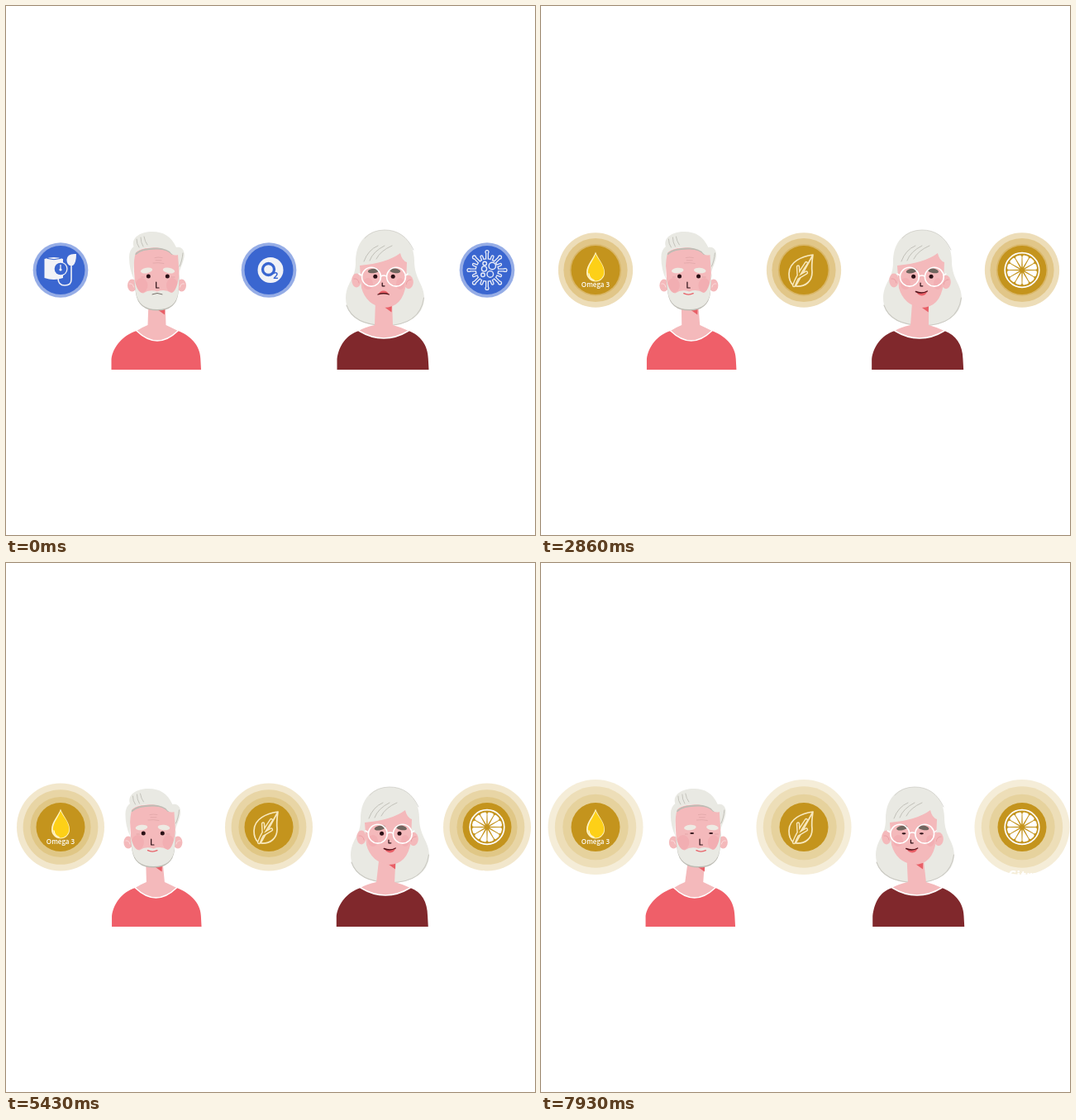
Recreate the animation shown at these times as an HTML page with a canvas. Size 640 by 640 pixels, loop 8000 ms.

```html
<!DOCTYPE html>
<html lang="en">
<head>
<meta charset="utf-8">
<title>Wellness</title>
<style>
html, body { margin: 0; width: 100%; height: 100%; overflow: hidden; background: #fff; }
canvas { display: block; width: 100vmin; height: 100vmin; }
</style>
</head>
<body>
<canvas id="stage" width="640" height="640"></canvas>
<script>
const ctx = document.getElementById('stage').getContext('2d');
const LOOP = 8000, CY = 319.5, TAU = Math.PI * 2;
const DISCS = [66, 318, 582];
const BLUE = [58, 102, 208], GOLD = [196, 148, 29];
const SKIN = '#f4b9bb', HAIR = '#e9e9e3', SHADE = '#bdbcb4', RED = '#e85f67', DARK = '#2b1016';
const SWAP = 2420;
const PULSES = [-30, 2370, 4750, 7130], PULSE_MS = 1150;
const MAN_SWAY = [[2430, 0], [3350, -8], [4400, 8], [5700, -6], [7200, 0], [8000, 8]];
const WOMAN_SWAY = [[2430, 0], [3300, 6], [4350, -6], [5400, 6], [7210, -1], [7950, -6]];

const clamp = x => Math.min(1, Math.max(0, x));
const mix = (a, b, k) => a + (b - a) * k;
const ease = x => (1 - Math.cos(Math.PI * clamp(x))) / 2;
const span = (t, a, b) => clamp((t - a) / (b - a));
const rgb = (c, a = 1) => `rgba(${c.map(Math.round).join(',')},${a})`;

function track(keys, t) {
  if (t <= keys[0][0]) return keys[0][1];
  for (let i = 1; i < keys.length; i++) {
    const [a, va] = keys[i - 1], [b, vb] = keys[i];
    if (t < b) return mix(va, vb, ease((t - a) / (b - a)));
  }
  return keys[keys.length - 1][1];
}

function fill(d, color) {
  ctx.fillStyle = color;
  ctx.fill(new Path2D(d));
}
function line(d, color, width = 1) {
  ctx.strokeStyle = color;
  ctx.lineWidth = width;
  ctx.stroke(new Path2D(d));
}
function oval(x, y, rx, ry, color, turn = 0) {
  ctx.beginPath();
  ctx.ellipse(x, y, rx, ry, turn, 0, TAU);
  ctx.fillStyle = color;
  ctx.fill();
}
const dot = (x, y, r, color) => oval(x, y, r, r, color);
function ring(x, y, r, color, width) {
  ctx.beginPath();
  ctx.arc(x, y, r, 0, TAU);
  ctx.strokeStyle = color;
  ctx.lineWidth = width;
  ctx.stroke();
}
function label(s, x, y, font, color) {
  ctx.font = font;
  ctx.textAlign = 'center';
  ctx.fillStyle = color;
  ctx.fillText(s, x, y);
}
function shifted(dx, draw) {
  ctx.save();
  ctx.translate(dx, 0);
  draw();
  ctx.restore();
}

// Icons are drawn in stage coordinates; bg is the disc colour behind them.
function pressureIcon(bg) {
  const w = '#f1f2f7';
  fill('M46.5 306 Q58 302 69 306 V329 Q58 333 46.5 329Z', w);
  line('M50 305.5 Q58 308 66 305.5', bg, 1);
  dot(66, 318, 8.6, w);
  dot(66, 318, 7.3, bg);
  line('M66 313.5 V319', w, 1.3);
  dot(66, 319, 1.6, w);
  line('M63 329 Q63 338 71 338 Q79 338 79 331 V312', w, 1.6);
  fill('M85 300 Q74 299 73.5 307 Q73.5 312 77 314 H81 Q85 311 85 300Z', w);
}

function oxygenIcon(bg) {
  dot(320, 319.5, 15.5, '#f1f2f7');
  ring(317.5, 318.5, 7, bg, 3.3);
  label('2', 326.2, 330, 'bold 10.5px "Open Sans", sans-serif', bg);
}

function virusIcon(bg) {
  const layer = (color, grow) => {
    for (let i = 0; i < 16; i++) {
      const a = i * TAU / 16, long = i % 2 === 0;
      const x = Math.cos(a), y = Math.sin(a), r = long ? 22 : 17.5;
      line(`M${582 + x * 12} ${CY + y * 12} L${582 + x * r} ${CY + y * r}`, color, 1.4 + grow * 2);
      if (long) dot(582 + x * r, CY + y * r, 1.3 + grow, color);
    }
    dot(582, CY, 13 + grow, color);
  };
  layer('#e9edf8', 1.3);
  layer(bg, 0);
  [[588.3, 314.5, 4.2], [578.5, 318, 3.1], [585.8, 324.4, 3.8], [577, 325.3, 2.3], [579.2, 311.5, 2.3]]
    .forEach(([x, y, r]) => ring(x, y, r, '#e9edf8', 1.4));
}

function omegaIcon() {
  fill('M66 297.5 C63 306 55 313 55 322.5 A11 11 0 0 0 77 322.5 C77 313 69 306 66 297.5Z', '#fff3c4');
  fill('M66 300 C64 307 57 314 56.8 322 A9.6 10 0 0 0 76.3 322.5 C76.3 313 69 307 66 300Z', '#fdd017');
  line('M58 324 Q59 330 64 331.5', '#fff7da', 1.3);
  label('Omega 3', 66, 340, '600 8px "Open Sans", sans-serif', '#fff');
}

function leafIcon(bg) {
  const c = '#f8e8bd';
  line('M329 301 C316 303 300 309 300 324 C300 331 302 335 305 337.5 M308 339 C320 340 328 333 328 322 C327 314 328 308 329 301Z', c, 1.7);
  const veins = 'M306 338 Q310 327 321 311 M311.5 325 L311 315.5 M310 329 L321 322.5';
  line(veins, c, 4.4);
  line(veins, bg, 1.5);
}

function citrusIcon() {
  ring(582, CY, 20.8, '#fff', 1.7);
  ctx.fillStyle = '#fff';
  for (let i = 0; i < 12; i++) {
    ctx.save();
    ctx.translate(582, CY);
    ctx.rotate((i + 0.5) * TAU / 12);
    ctx.fill(new Path2D('M3 0 L15.5 -3.7 Q18 -4 18.1 -1.5 V1.5 Q18 4 15.5 3.7Z'));
    ctx.restore();
  }
}

const BEFORE = [pressureIcon, oxygenIcon, virusIcon];
const AFTER = [omegaIcon, leafIcon, citrusIcon];

function badges(t) {
  const k = span(t, 2000, SWAP);
  const tone = BLUE.map((v, i) => mix(v, GOLD[i], k)), bg = rgb(tone);
  const late = t >= SWAP;
  const size = late ? ease(span(t, SWAP, 2800)) : 1 - ease(k);

  for (const start of PULSES) {
    const p = (t - start) / PULSE_MS;
    if (p < 0 || p >= 1) continue;
    const r = mix(33.3, 64, ease(p));
    for (const x of DISCS)
      for (const f of [1, 0.855, 0.69]) dot(x, CY, r * f, rgb(tone, 0.55 * (1 - p)));
  }
  const font = 'bold 16px "Open Sans", sans-serif';
  if (late) {
    label('Citrus', 589, 384, font, '#fff');
  } else {
    label('Low o2', 316, 382, font, '#fff');
    label('Immune', 585, 387, font, '#fff');
  }
  DISCS.forEach((x, i) => {
    dot(x, CY, 29.5, bg);
    ctx.save();
    ctx.translate(x, CY);
    ctx.scale(size, size);
    ctx.translate(-x, -CY);
    (late ? AFTER : BEFORE)[i](bg);
    ctx.restore();
  });
}

// Neck, shoulders and collar; the neck top follows the head, the collar lags.
function torso(b, dx) {
  const c = dx * 0.35, s = -dx * 0.12, l = b.left + c, r = b.right + c, mid = (l + r) / 2;
  const collar = `Q${mid} ${b.dip} ${r} 393`;
  fill(`M${b.outL + s} 440 L${b.outL + s} 427 C${b.outL + 2 + s} 412 ${l - 16} 398 ${l} 393 ${collar}
    C${r + 14} 398 ${b.outR - 1 + s} 410 ${b.outR - 0.7 + s} 427 L${b.outR + s} 440Z`, b.color);
  const n = b.neck, top = n + dx * 0.75, base = n + c;
  fill(`M${top - 10} 356 H${top + 10} L${base + 11} 386 Q${r - 8} 389 ${r} 393
    Q${mid} ${b.dip} ${l} 393 Q${l + 6} 389 ${base - 11} 386Z`, SKIN);
  fill(`M${top - 1} ${b.shade} H${top + 9.8} L${top + 9.5} ${b.shade + 7.5}Z`, RED);
  line(`M${l} 393 ${collar}`, '#fff', 1.5);
}

function eyes(x1, x2, y, open) {
  for (const x of [x1, x2]) oval(x, y, 2.5, mix(1.1, 2.5, open), DARK);
}

function man(dx, happy, open) {
  torso({ left: 158, right: 208, dip: 417, outL: 127.5, outR: 236, neck: 182.5, shade: 366, color: '#ef5f69' }, dx);
  shifted(dx, () => {
    for (const [x, s] of [[152.5, 1], [212.5, -1]]) {
      oval(x, 338, 5.5, 7.5, SKIN);
      line(`M${x - 3 * s} 336 Q${x + s} 335 ${x + 2 * s} 340`, '#fbdcdc', 1);
    }
    fill('M154 303 Q156 292 182 292 Q208 292 210 303 L209 338 Q206 366 183 366 Q160 366 156 338Z', SKIN);
    oval(164, 338, 7.5, 9, '#f2aeb2');
    oval(201, 338, 7, 9, '#f2aeb2');
    const beard = 'M154 322 Q157 347 166 347.5 Q174 342 183 345.5 Q192 342 200 347 Q207 346 210 322 L208.5 346 Q206 367 183 367 Q160 367 157 346Z';
    ctx.save();
    ctx.translate(0, 1.5);
    fill(beard, SHADE);
    ctx.restore();
    fill(beard, HAIR);
    line('M157 300 Q164 293 184 293.5 Q196 294 201 300', SHADE, 2);
    fill(`M154.5 291 C151 280 163 273 177 273 C191 273 200 279 206 292
      C213 290 217 297 215.5 304 C214 312 211 316 209.5 323 L208 301
      Q202 303 198 297 Q190 292 178 292 Q163 292 157 298 Q154 307 154.5 330
      Q149 318 149 304 Q149 295 154.5 291Z`, HAIR);
    line('M158 282 Q158 288 161 292 M163 280 Q163 286 166 291 M167 279 Q168 285 171 289', '#bab9b2', 0.8);
    line('M214 299 Q213 309 210 315', SHADE, 0.9);
  });
  shifted(dx * 1.32, () => {
    line('M180 304.5 Q184 303.5 189 304.5 M178 311 Q184 310 191 311.5 M181 307.7 H188', '#dda4a5', 0.7);
    oval(170, 320, 7.3, 3.2, '#eeeae3', mix(-0.18, -0.1, happy));
    oval(197, 320, 7.3, 3.2, '#eeeae3', mix(0.18, 0.1, happy));
    eyes(172.3, 195.3, 327, open);
    line('M164 328 H167 M200 328 H204', '#dfa0a3', 0.7);
    line('M181.7 334 V341 H185', DARK, 1.2);
    if (happy > 0.5) line('M177.5 347.7 Q183 350.5 189 347.7', RED, 1.3);
    else line('M177 348.8 Q183 346 189 348.8', '#777069', 1);
  });
}

function woman(dx, happy, open) {
  const back = `M423 310 C423 285 437 271 458 271 C480 271 494 287 494 308 C494 331 506 336 506 354
    C505 376 484 387 459 387 C430 387 411 375 411 353 C412 333 423 331 423 310Z`;
  shifted(dx, () => {
    fill(back, HAIR);
    line('M434 281 Q443 271 458 271 Q482 271 493 295', '#d0cfc8', 0.8);
    line('M412 362 Q420 386 459 386.7 Q501 386 505.5 353', '#cbcac3', 1.1);
  });
  torso({ left: 427, right: 487, dip: 411, outL: 400.5, outR: 511.5, neck: 457, shade: 363, color: '#80282c' }, dx);
  shifted(dx, () => {
    oval(424, 332, 5.7, 8.5, SKIN);
    oval(487, 334, 5.8, 8.3, SKIN);
    line('M421 330 Q426 329 427 335 M490 331 Q485 331 484 337', '#e99ca2', 0.9);
    fill(`M428 314 Q461 311 477 299 Q479 308 485 310 L484 336 Q480 365 457 365
      Q436 362 430 341Z`, SKIN);
    oval(438, 336, 6, 7, '#f2afb3');
    oval(477, 336, 5, 7, '#f2afb3');
    line('M433 309 Q438 295 450 290 M440 308 Q444 297 458 290 M448 306 Q453 296 467 290', '#bdbcb4', 0.9);
  });
  shifted(dx * 1.3, () => {
    oval(444.5, 320.5, 6.7, 2.8, '#71665f', mix(-0.1, -0.2, happy));
    oval(470.5, 320.3, 6.7, 2.8, '#71665f', mix(0.15, 0.2, happy));
    eyes(446.8, 468.2, 327.3, open);
    ring(442, 327.7, 11.4, '#fff', 1.6);
    ring(472, 327.7, 11.4, '#fff', 1.6);
    line('M453.5 327 Q457 325 460.5 327 M430.6 326 L427 324 M483.4 326 L486 324', '#fff', 1.5);
    line('M455.2 335 V338.8 H458', DARK, 1.2);
    if (happy > 0.5) {
      fill('M450 345.5 Q457 348 463.5 345 Q462 350 457 350.5 Q452 350 450 345.5Z', RED);
      line('M449.5 345.5 Q457 348.7 463.5 345', '#52151c', 1.4);
    } else {
      fill('M450 348.5 Q454 344 456.5 344.6 Q460 344 463.3 348.5 Q457 347 450 348.5Z', RED);
      line('M450 349 Q457 346.5 463.3 349', '#52151c', 1.3);
    }
  });
}

function frame(now) {
  const t = now % LOOP;
  ctx.fillStyle = '#fff';
  ctx.fillRect(0, 0, 640, 640);
  ctx.lineCap = ctx.lineJoin = 'round';
  badges(t);
  const happy = ease(span(t, 2430, 2900));
  let open = 1;
  if (t > 2800) {
    const gap = Math.abs((t - 3290 + 1160) % 2320 - 1160);
    open = ease(span(gap, 40, 140));
  }
  man(track(MAN_SWAY, t), happy, open);
  woman(track(WOMAN_SWAY, t), happy, open);
}

const begin = performance.now();
function tick() {
  frame(performance.now() - begin);
  requestAnimationFrame(tick);
}
tick();
</script>
</body>
</html>
```
